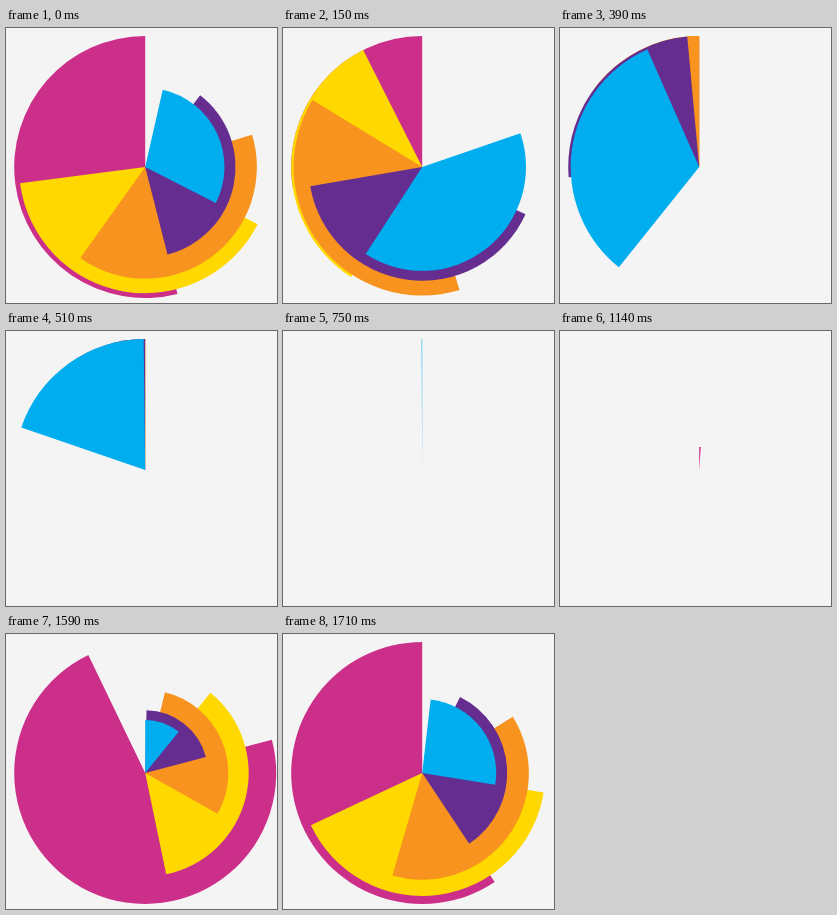
An HTML page for the animation above (1740 ms loop, 271 by 275 pixels).

```html
<!DOCTYPE html>
<html lang="en">
<head>
<meta charset="utf-8">
<title>Pie sweep</title>
<style>
  html, body { margin: 0; width: 100%; height: 100%; overflow: hidden; background: #f4f4f4; }
  svg { display: block; width: 100%; height: 100%; }
</style>
</head>
<body>
<svg id="pie" viewBox="0 0 271 275"></svg>
<script>
  const LOOP = 1740, STEP = 30, IDLE = 900;
  const CX = 139.2, CY = 139, R = 131, R_MIN = 10;
  const SWEEP = LOOP / 2, STAGGER = 77;

  // head: when the leading edge starts and how long it takes; grow: same for the radius
  const wedges = [
    { color: '#cc2f8a', head: [1100, 592], grow: [1026, 537] },
    { color: '#ffd800', head: [1173, SWEEP], grow: [1048, 793] },
    { color: '#f7931e', head: [1250, SWEEP], grow: [1094, 875] },
    { color: '#662d91', head: [1327, SWEEP], grow: [1120, 1023] },
    { color: '#00aeef', head: [1404, SWEEP], grow: [1151, 1078] }
  ];

  const svg = document.getElementById('pie');
  wedges.forEach((w, i) => {
    w.tail = [1327 + i * STAGGER, SWEEP];
    w.path = document.createElementNS('http://www.w3.org/2000/svg', 'path');
    w.path.setAttribute('fill', w.color);
    svg.append(w.path);
  });

  // Sine ease in and out, held at both ends
  function ease(t, [start, span]) {
    const p = Math.min(1, Math.max(0, (t - start) / span));
    return (1 - Math.cos(Math.PI * p)) / 2;
  }

  function point(turn, r) {
    const a = turn * 2 * Math.PI;
    return (CX + r * Math.sin(a)).toFixed(3) + ' ' + (CY - r * Math.cos(a)).toFixed(3);
  }

  function sector(from, to, r) {
    if (to - from < 0.0001) return '';
    const mid = (from + to) / 2;
    const arc = turn => `A${r} ${r} 0 0 1 ${point(turn, r)}`;
    return `M${CX} ${CY}L${point(from, r)}${arc(mid)}${arc(to)}Z`;
  }

  function draw(ms) {
    const tick = Math.floor((ms + 1) / STEP) * STEP;
    const t = IDLE + (tick - IDLE + LOOP) % LOOP;
    const time = t < IDLE ? t + LOOP : t;
    for (const w of wedges) {
      const r = R_MIN + (R - R_MIN) * ease(time, w.grow);
      w.path.setAttribute('d', sector(ease(time, w.tail), ease(time, w.head), r));
    }
  }

  const origin = performance.now();
  function frame() {
    draw(performance.now() - origin);
    requestAnimationFrame(frame);
  }
  draw(0);
  requestAnimationFrame(frame);
</script>
</body>
</html>
```
